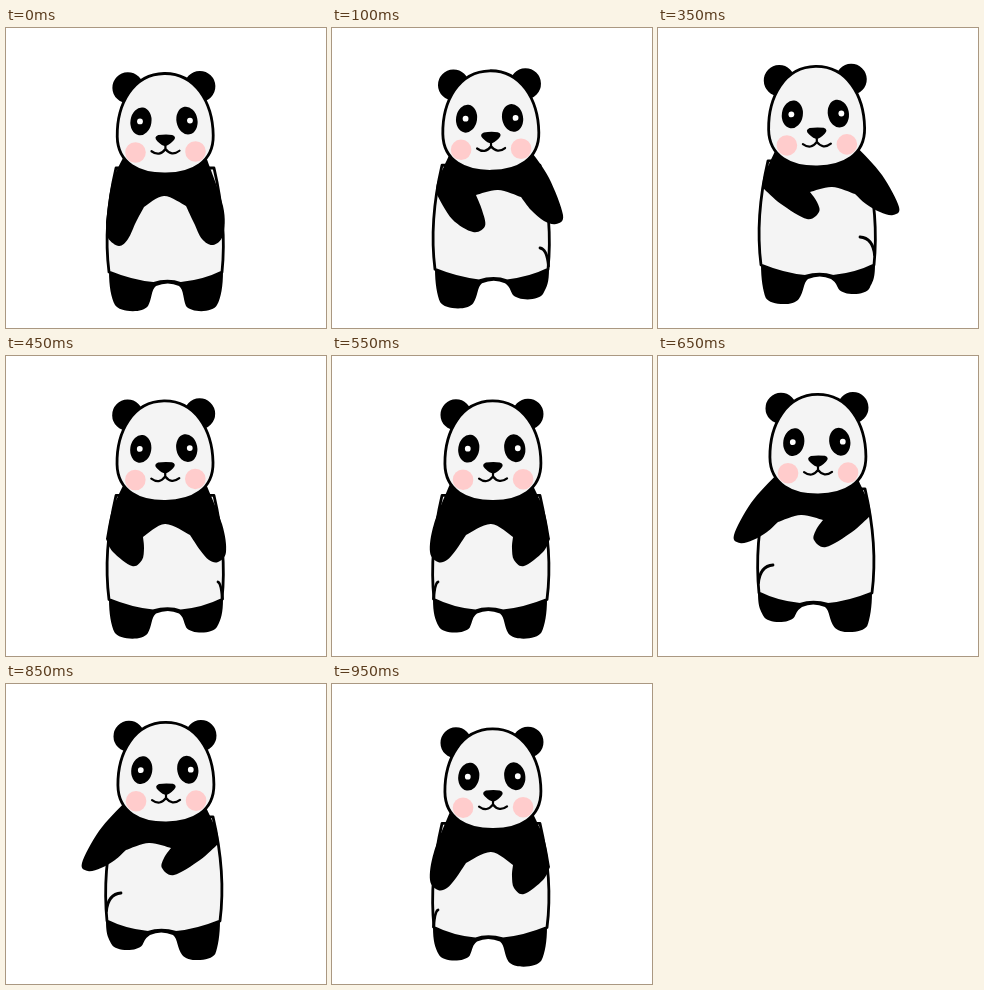
These frames come from a looping animation (320x300 px, 1 s). An HTML page with a canvas:

```html
<!DOCTYPE html>
<html lang="en">
<head>
<meta charset="utf-8">
<title>Dancing panda</title>
<style>
html, body { margin: 0; width: 100%; height: 100%; overflow: hidden; background: #fff; }
canvas { display: block; width: 320px; height: 300px; }
</style>
</head>
<body>
<canvas id="stage" width="320" height="300"></canvas>
<script>
const ctx = document.getElementById('stage').getContext('2d');
const FUR = '#f4f4f4', INK = '#000', BLUSH = '#ffcccc';
const STEP = 50, STEPS = 20, PEAK = 5;

// Swing poses: near arm (6 points), belly top (2), far arm (5)
const POSES = [
  [100,195, 102,210, 113,218, 122,211, 130,194, 138,179, 158,168, 180,178, 188,195, 196,211, 207,217, 217,207, 217,178],
  [100,183, 107,196, 126,210, 136,204, 138,192, 137,181, 159,168, 184,179, 194,194, 203,204, 212,206, 220,196, 216,168],
  [104,165, 120,191, 141,204, 153,198, 150,182, 144,167, 166,162, 189,169, 199,182, 212,193, 224,196, 231,187, 217,150],
  [105,160, 123,176, 149,191, 161,184, 159,174, 152,164, 174,159, 197,166, 208,176, 222,184, 235,187, 241,179, 224,147],
  null,
  [104,143, 137,147, 168,147, 172,147, 172,148, 173,148, 190,146, 211,143, 230,146, 248,146, 261,139, 258,127, 233,114]
];
POSES[4] = POSES[3].map((v, i) => (v + POSES[5][i]) / 2);

const LIFT = [0, 6, 9, 10, 9, 8];
const CREASE = [null, [212, 226, 243], [208, 220, 238], [202, 209, 227], [196, 199, 221], [189, 190, 216]];

const rise = k => -23.5 * Math.pow(k / PEAK, 2.35);

function pairs(list) {
  const out = [];
  for (let i = 0; i < list.length; i += 2) out.push([list[i], list[i + 1]]);
  return out;
}

// Smooth run through points, continuing the current path
function curve(pts) {
  for (let i = 0; i < pts.length - 1; i++) {
    const a = pts[Math.max(i - 1, 0)], b = pts[i], c = pts[i + 1], d = pts[Math.min(i + 2, pts.length - 1)];
    ctx.bezierCurveTo(
      b[0] + (c[0] - a[0]) / 6, b[1] + (c[1] - a[1]) / 6,
      c[0] - (d[0] - b[0]) / 6, c[1] - (d[1] - b[1]) / 6,
      c[0], c[1]);
  }
}

function shape(d, fill, stroke, width = 3) {
  const p = new Path2D(d);
  if (fill) { ctx.fillStyle = fill; ctx.fill(p); }
  if (stroke) { ctx.strokeStyle = stroke; ctx.lineWidth = width; ctx.stroke(p); }
}

function oval(x, y, rx, ry, fill, turn = 0) {
  ctx.beginPath();
  ctx.ellipse(x, y, rx, ry, turn, 0, Math.PI * 2);
  ctx.fillStyle = fill;
  ctx.fill();
}

function drawLegs(k) {
  const u = LIFT[k], s = k * 0.4;
  shape(`M103 243 C103 258 105 270 ${109 - s} 277 C${113 - s} 284 ${136 - s} 286 ${142 - s} 278
    C146 271 145 262 150 258 Q162 253 173 258
    C178 262 177 ${271 - u} ${180 + s / 2} ${278 - u} C${185 + s / 2} 
    ${285 - u} ${207 + s / 2} ${285 - u} ${211 + s / 2} ${277 - u}
    C215 ${270 - u} 217 258 217 243 Z`, INK);
}

function drawBody(k, dy) {
  ctx.save();
  ctx.translate(0, dy);
  drawLegs(k);
  shape(`M110 140 C103 170 98 205 103 244 Q125 253 147 255.5 Q162 251 175 255.5
    Q198 253 216 244 C220 205 215 170 208 140 Z`, FUR, INK, 2.8);
  ctx.restore();

  const c = CREASE[k];
  if (c) shape(`M${c[0]} ${c[1]} Q215 ${c[1] + 1} 216.5 ${c[2]}`, null, INK, 2.8);

  const p = pairs(POSES[k]);
  const neckL = [119, 126 + dy], neckR = [199, 126 + dy], shoulder = [106, 155 + dy];
  ctx.beginPath();
  ctx.moveTo(...neckL);
  curve([neckL, shoulder, p[0]]);
  curve(p.slice(0, 6));
  curve(p.slice(5, 8));
  curve([...p.slice(7), neckR]);
  ctx.closePath();
  ctx.fillStyle = INK;
  ctx.fill();
}

function drawHead() {
  oval(122.5, 59, 15.5, 15.5, INK);
  oval(194.5, 59, 15.5, 15.5, INK);
  shape(`M159 45.5 C190 45.5 207 75 207 108 C207 135 185 146 159 146
    C133 146 111 135 111 108 C111 75 128 45.5 159 45.5 Z`, FUR, INK, 2.8);
  oval(129, 124, 10.3, 10.3, BLUSH);
  oval(189, 124, 10.3, 10.3, BLUSH);
  oval(135, 93, 10.5, 14, INK, 0.17);
  oval(181, 93, 10.5, 14, INK, -0.17);
  oval(134, 93, 2.9, 2.9, '#fff');
  oval(184, 93, 2.9, 2.9, '#fff');
  shape('M152 107 Q159 106 166 107 Q171 109 167 113 Q162 118 159 118 Q156 118 151 113 Q147 109 152 107 Z', INK);
  shape('M159 116 V121 M145 123 Q153 129 159 121 Q165 129 173 123', null, INK, 2.2);
}

// At full swing the near arm crosses in front of the chin
function drawFrontArm() {
  shape('M104 143 Q104 122 117 109 Q150 111 169 121 Q179 127 179 135 Q178 144 168 147 Q136 150 104 143 Z', INK);
  shape('M173 124 Q185 135 172 145', null, '#777', 1.4);
}

function draw(n) {
  const left = n > 10;
  const phase = n % 10;
  const k = PEAK - Math.abs(PEAK - phase);
  const dy = rise(k);
  const mirror = draw => {
    ctx.save();
    if (left) {
      ctx.translate(318.5 - k / 2, 0);
      ctx.scale(-1, 1);
    }
    draw();
    ctx.restore();
  };

  ctx.fillStyle = '#fff';
  ctx.fillRect(0, 0, 320, 300);
  mirror(() => drawBody(k, dy));

  ctx.save();
  ctx.translate(159 + (left ? 2.3 - k / 2 : -k / 5), 95 + dy);
  ctx.rotate((left ? -0.5 : -1) * Math.PI / 180);
  ctx.translate(-159, -95);
  drawHead();
  ctx.restore();

  if (k === PEAK) mirror(drawFrontArm);
}

ctx.lineCap = ctx.lineJoin = 'round';

function tick() {
  draw(Math.floor(performance.now() / STEP) % STEPS);
  requestAnimationFrame(tick);
}
tick();
</script>
</body>
</html>
```
